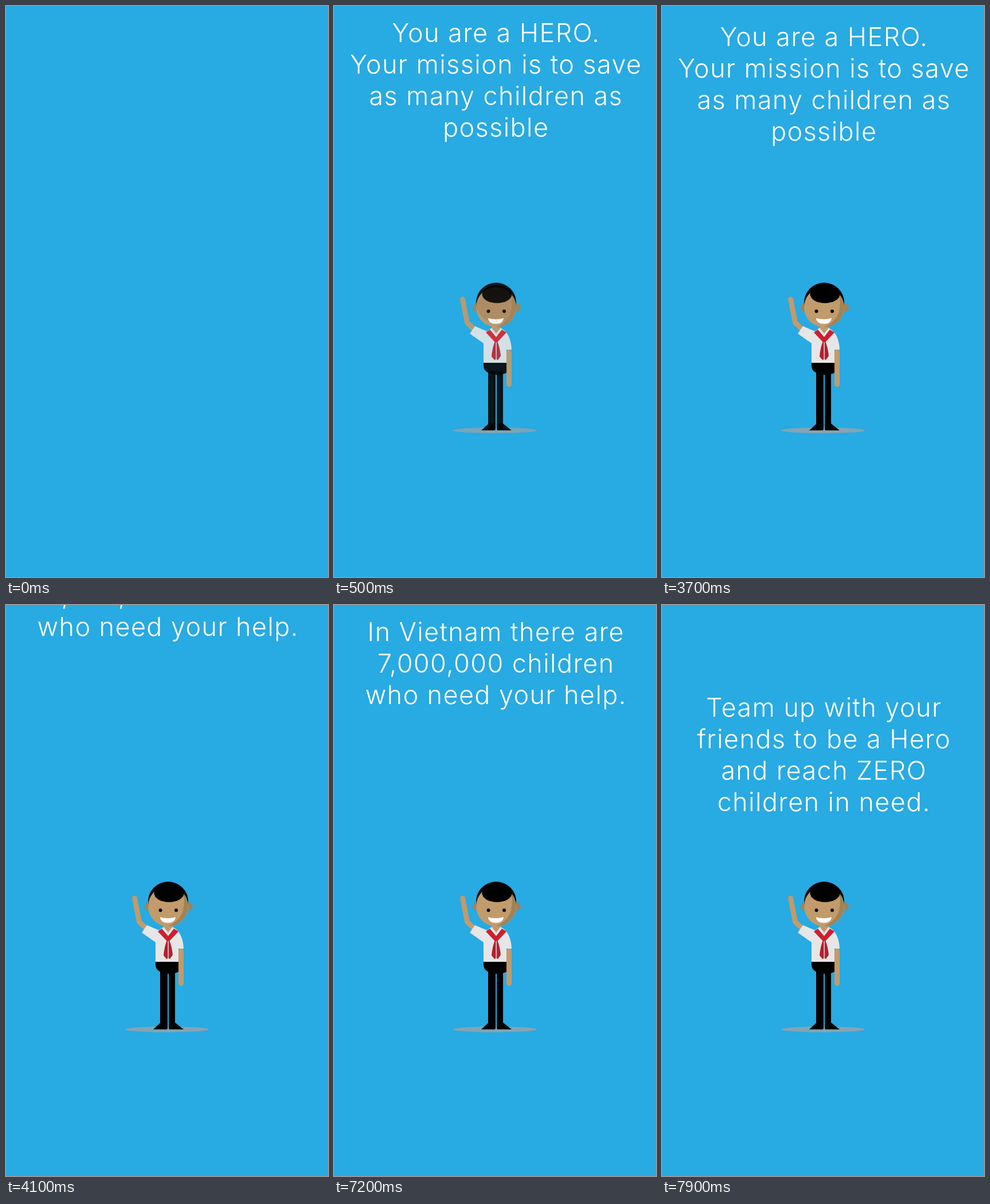
Recreate the animation shown at these times as an HTML page. Size 562 by 997 pixels, loop 8 s.

```html
<!DOCTYPE html>
<html lang="en">
<head>
<meta charset="utf-8">
<style>
  html, body { margin: 0; height: 100%; overflow: hidden; background: #28aae2; }
  svg { display: block; width: 100%; height: 100%; }
  text { font: 300 45px Inter, Lato, sans-serif; letter-spacing: 1.4px; fill: #fff; text-anchor: middle; }
  #hero > * { opacity: var(--fade); }
  .dark { fill: var(--dark); }
  .skin { fill: #c19b6c; }
  .shade { fill: #a18356; }
  .arm { fill: none; stroke: #c19b6c; stroke-width: 9; stroke-linecap: round; stroke-linejoin: round; }
</style>
</head>
<body>
<svg viewBox="0 0 562 997">
  <g id="hero">
    <ellipse cx="281" cy="741" rx="73" ry="5" fill="#84a4b3"/>
    <!-- legs and shoes -->
    <path class="dark" d="M269 638H282V740H269ZM284 638H295V740H284Z"/>
    <path class="dark" d="M257 741L270 729H281V741ZM285 741V729H295L310 741Z"/>
    <path class="dark" d="M261 623H302V640Q293 645 283 644Q262 642 261 629Z"/>
    <!-- arms -->
    <path class="arm" d="M224.5 512L232.5 553L243 563"/>
    <path class="arm" d="M305.5 604.5V660.5"/>
    <!-- shirt and scarf -->
    <path class="skin" d="M275 556H291V565L283 574L275 565Z"/>
    <path fill="#e6e6e7" d="M246 559L267 568L275 562L283 572L291 562L298 567Q309 578 310 600H301V623H261V589L237 572Z"/>
    <path fill="#b3202e" d="M281 585H282.4V617L280 618L275 612Q276 598 281 585ZM285 585H283.8V617L286 618L291 611Q290 598 285 585Z"/>
    <path fill="#cb202f" d="M265 570L272 565L283 578L293 565L301 570L285 587H281Z"/>
    <!-- head -->
    <ellipse class="shade" cx="249.5" cy="526.5" rx="7.5" ry="7"/>
    <ellipse class="shade" cx="318.5" cy="526.5" rx="7.5" ry="7"/>
    <circle class="dark" cx="283" cy="518" r="35"/>
    <circle class="skin" cx="283" cy="526" r="35"/>
    <path class="shade" d="M309 503A35 35 0 0 1 283 561Q318 545 309 503Z"/>
    <ellipse class="dark" cx="284.5" cy="503.3" rx="26" ry="15.5"/>
    <circle class="dark" cx="269.5" cy="533" r="3"/>
    <circle class="dark" cx="297" cy="533" r="3"/>
    <path fill="#fff" d="M269 545Q282.5 549 296 545Q295 555 282.5 555Q270 555 269 545Z"/>
  </g>
</svg>
<script>
const LOOP = 8000, STEP = 100;
const svg = document.querySelector('svg');
const hero = document.getElementById('hero');

// Times in ms, speeds in px per ms
const messages = [
  { arrive: 600, inSpeed: 1.32, leave: 3600, outSpeed: 1.255,
    lines: ['You are a HERO.', 'Your mission is to save', 'as many children as', 'possible'] },
  { arrive: 4300, inSpeed: 1.255, leave: 7100, outSpeed: 1.32,
    lines: ['In Vietnam there are', '7,000,000 children', 'who need your help.'] },
  { arrive: 7900, inSpeed: 9, leave: LOOP, outSpeed: 1.32,
    lines: ['Team up with your', 'friends to be a Hero', 'and reach ZERO', 'children in need.'] }
];

function add(parent, tag, attrs = {}) {
  const node = document.createElementNS('http://www.w3.org/2000/svg', tag);
  for (const key in attrs) node.setAttribute(key, attrs[key]);
  return parent.appendChild(node);
}

for (const message of messages) {
  message.group = add(svg, 'g');
  message.lines.forEach((line, i) => {
    add(message.group, 'text', { x: 282.7, y: 195 + 55 * i }).textContent = line;
  });
}

function draw(t) {
  const fade = Math.min(1, Math.max(0, (t - 200) / 333));
  const grey = Math.round((1 - fade) * 60);
  hero.style.setProperty('--fade', fade);
  hero.style.setProperty('--dark', `rgb(${grey},${grey},${grey})`);
  for (const m of messages) {
    const lift = Math.max(0, (m.arrive - t) * m.inSpeed, (t - m.leave) * m.outSpeed);
    m.group.setAttribute('transform', `translate(0 ${-lift})`);
  }
}

function tick() {
  draw(Math.floor(performance.now() % LOOP / STEP) * STEP);
  requestAnimationFrame(tick);
}
tick();
</script>
</body>
</html>
```
